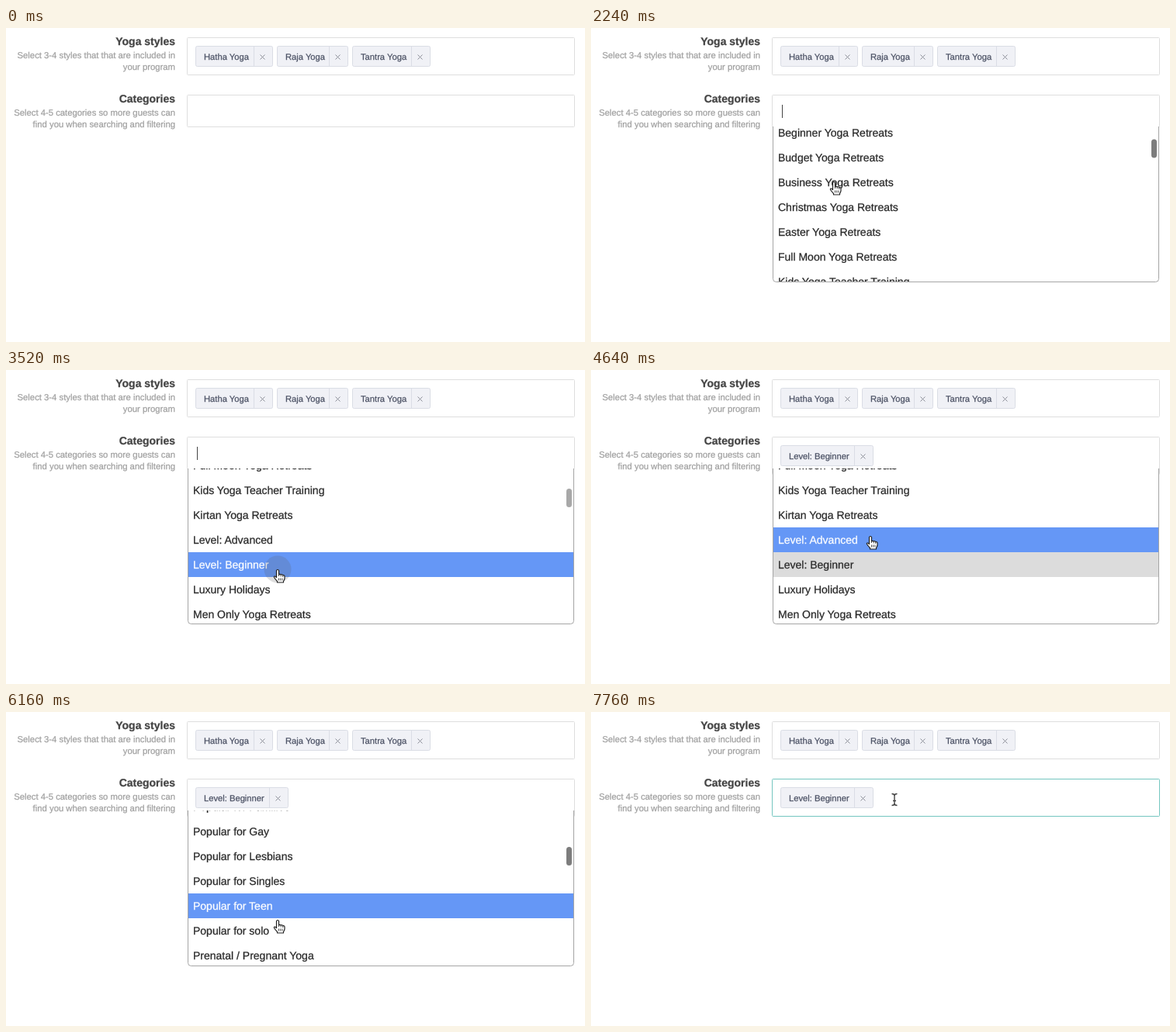
These frames come from a looping animation (746 px wide and 405 px high, 8000 ms). An HTML page with a canvas:

```html
<!DOCTYPE html>
<html lang="en">
<head>
<meta charset="utf-8">
<title>Category picker</title>
<style>
html, body { margin: 0; height: 100%; overflow: hidden; background: #fff; }
canvas { display: block; }
</style>
</head>
<body>
<canvas id="stage" width="746" height="405"></canvas>
<script>
const ctx = document.getElementById('stage').getContext('2d');
ctx.textRendering = 'geometricPrecision';
ctx.lineJoin = 'round';

const LOOP = 8000, STEP = 80, ROW = 32, TOP = 127;
const FONT = '"Liberation Sans", Arial, sans-serif';
const OPEN = 880, PICKED = 4080, CLOSE = 7280, PICK = 17;
const CLICKS = [480, 3440, 6880];

const rows = [
  ...[100, 200, 300, 500].map(n => n + '-Hour Yoga Teacher Training'),
  ...['Adventure', 'All-Inclusive', 'Ashram', 'Beach', 'Beginner', 'Budget', 'Business',
    'Christmas', 'Easter', 'Full Moon'].map(s => s + ' Yoga Retreats'),
  'Kids Yoga Teacher Training', 'Kirtan Yoga Retreats', 'Level: Advanced', 'Level: Beginner',
  'Luxury Holidays', 'Men Only Yoga Retreats', 'Mountain Yoga Retreats', 'Music Yoga Retreats',
  'New Year Yoga Retreats', 'Nude / Naked Yoga Retreats',
  ...['Couples', 'Families', 'Gay', 'Lesbians', 'Singles', 'Teen', 'solo'].map(s => 'Popular for ' + s),
  'Prenatal / Pregnant Yoga', 'Romantic Yoga Retreats'
];

// Flicks of the list: each coasts to a stop.
const flicks = [
  { start: 1680, end: 2320, by: 268 },
  { start: 2505, end: 3360, by: 168 },
  { start: 4920, end: 5807, by: 304 },
  { start: 5810, end: 6140, by: 81 }
];

// Pointer moves: each eases from the last place to (x, y).
const moves = [
  { start: 160, end: 320, x: 301, y: 115 },
  { start: 1500, end: 1620, x: 313, y: 198 },
  { start: 2720, end: 3360, x: 350, y: 257 },
  { start: 4100, end: 4600, x: 360, y: 214 },
  { start: 5000, end: 5500, x: 364, y: 225 },
  { start: 5840, end: 6160, x: 350, y: 268 },
  { start: 6240, end: 6700, x: 391, y: 117 },
  { start: 7600, end: 7760, x: 391, y: 113 }
];

const ramp = (t, start, end) => Math.min(1, Math.max(0, (t - start) / (end - start)));
const easeOut = p => p * (2 - p);
const smooth = p => p * p * (3 - 2 * p);

const scrollAt = t => Math.round(flicks.reduce((sum, f) => sum + f.by * easeOut(ramp(t, f.start, f.end)), 0));

function pointerAt(t) {
  return moves.reduce((from, m) => {
    const p = smooth(ramp(t, m.start, m.end));
    return { x: from.x + (m.x - from.x) * p, y: from.y + (m.y - from.y) * p };
  }, { x: 379, y: 289 });
}

// The highlight trails the pointer by one step and is frozen while the list coasts.
function hoverAt(t) {
  const flick = flicks.find(f => t >= f.start && t < f.end);
  const seen = flick ? flick.start : t;
  return Math.max(0, Math.floor((pointerAt(seen - STEP).y - TOP + scrollAt(seen)) / ROW));
}

function text(s, x, y, size, color, weight = '', align = 'left') {
  ctx.font = `${weight} ${size}px ${FONT}`;
  ctx.fillStyle = ctx.strokeStyle = color;
  ctx.lineWidth = .25;
  ctx.textAlign = align;
  ctx.fillText(s, x, y);
  ctx.strokeText(s, x, y);
}

function box(x, y, w, h, r, stroke, fill) {
  ctx.beginPath();
  ctx.roundRect(x + .5, y + .5, w - 1, h - 1, r);
  ctx.fillStyle = fill;
  ctx.fill();
  ctx.strokeStyle = stroke;
  ctx.lineWidth = 1;
  ctx.stroke();
}

function lines(d, color, width) {
  ctx.strokeStyle = color;
  ctx.lineWidth = width;
  ctx.stroke(new Path2D(d));
}

function label(y, title, ...help) {
  text(title, 218, y, 14, '#444', 'bold', 'right');
  help.forEach((s, i) => text(s, 218, y + 17 + 15 * i, 11.3, '#a0a0a0', '', 'right'));
}

function chip(x, y, w, s) {
  const right = x + w, cx = right - 13.5, cy = y + 14.5;
  box(x, y, w, 27, 2, '#dadde5', '#f0f1f6');
  lines(`M${right - 24.5} ${y + 1}v25`, '#dadde5', 1);
  text(s, x + 11, y + 18, 11.2, '#4d5366');
  lines(`M${cx - 3} ${cy - 3}l6 6m0-6l-6 6`, '#8b8e98', 1);
}

function dropdown(t) {
  const scroll = scrollAt(t), hover = hoverAt(t);
  ctx.save();
  ctx.beginPath();
  ctx.rect(234, TOP, 498, 202);
  ctx.clip();
  box(234, TOP - 10, 498, 211, [0, 0, 4, 4], '#a5a5a5', '#fff');
  ctx.beginPath();
  ctx.rect(235, TOP, 496, 200);
  ctx.clip();
  rows.forEach((s, i) => {
    const y = TOP + i * ROW - scroll;
    if (i === hover || i === PICK && t >= PICKED) {
      ctx.fillStyle = i === hover ? '#6597f6' : '#dcdcdc';
      ctx.fillRect(235, y, 496, ROW);
    }
    text(s, 241, y + 21, 14, i === hover ? '#fff' : '#282828');
  });
  ctx.globalAlpha = 1 - ramp(t, 3440, 3680) + ramp(t, 4920, 5000);
  ctx.fillStyle = '#7d7d7d';
  ctx.beginPath();
  ctx.roundRect(722, 129 + scroll / 18.2, 7, 24, 3.5);
  ctx.fill();
  ctx.restore();
}

const HAND = new Path2D('M-1.5 1.5Q0-.5 1.5 1.5V7Q3 5.5 4.2 7.2Q5.8 6 6.7 7.8Q8.5 7 9 9V12' +
  'Q8.5 14 7.5 15.5V17H-.5V15.5Q-3 13-4.5 10.5Q-5 8.5-3 9.2L-1.5 10.5Z');
const ARROW = new Path2D('M0 0V14L3.3 11L5.5 16L8 15L5.8 10H10Z');
const BEAM = 'M-3.5-7.5Q0-7.5 0-5Q0-7.5 3.5-7.5M0-5V5M-3.5 7.5Q0 7.5 0 5Q0 7.5 3.5 7.5M-2 1.5H2';

function pointerShape(shape, fill, stroke) {
  ctx.fillStyle = fill;
  ctx.strokeStyle = stroke;
  ctx.lineWidth = 1.2;
  ctx.fill(shape);
  ctx.stroke(shape);
}

function pointer(t) {
  if (t < 160) return;
  const { x, y } = pointerAt(t);
  ctx.save();
  ctx.translate(x, y);
  const click = CLICKS.find(c => t >= c && t < c + 160);
  if (click) {
    const p = ramp(t, click, click + 160);
    ctx.fillStyle = `rgba(90,90,90,${.3 - .2 * p})`;
    ctx.beginPath();
    ctx.arc(0, 0, 11 + 13 * p, 0, 7);
    ctx.fill();
  }
  if (t < 320) {
    pointerShape(ARROW, '#111', '#fff');
  } else if (y < TOP) {
    lines(BEAM, '#fff', 3);
    lines(BEAM, '#444', 1.4);
  } else {
    pointerShape(HAND, '#fff', '#222');
    lines('M1.5 7v2M4.2 7.5v2M6.7 8v2M1.5 11.5v3M3.7 11.5v3M5.9 11.5v3', '#333', .9);
  }
  ctx.restore();
}

function draw(t) {
  ctx.fillStyle = '#fff';
  ctx.fillRect(0, 0, 746, 405);

  label(22, 'Yoga styles', 'Select 3-4 styles that that are included in', 'your program');
  box(233, 12, 500, 49, 1, '#dedede', '#fff');
  chip(244, 23, 100, 'Hatha Yoga');
  chip(349, 23, 92, 'Raja Yoga');
  chip(446, 23, 101, 'Tantra Yoga');

  label(96, 'Categories', 'Select 4-5 categories so more guests can', 'find you when searching and filtering');
  const focus = ramp(t, 880, 1120) - ramp(t, 1500, 1660) + ramp(t, 6700, 6960);
  const mix = (a, b) => a + (b - a) * focus;
  box(233, 86, 500, t < PICKED ? 42 : 49, 1, `rgb(${mix(222, 116)},${mix(222, 198)},${mix(222, 192)})`, '#fff');
  if (t >= PICKED) chip(244, 97, 120, 'Level: Beginner');
  else if (t >= 1100 && (t - 1100) % 1000 < 480) lines('M246.5 99v17', '#444', 1);

  if (t >= OPEN && t < CLOSE) dropdown(t);
  pointer(t);
}

function tick() {
  draw(Math.floor(performance.now() % LOOP / STEP) * STEP);
  requestAnimationFrame(tick);
}
tick();
</script>
</body>
</html>
```
